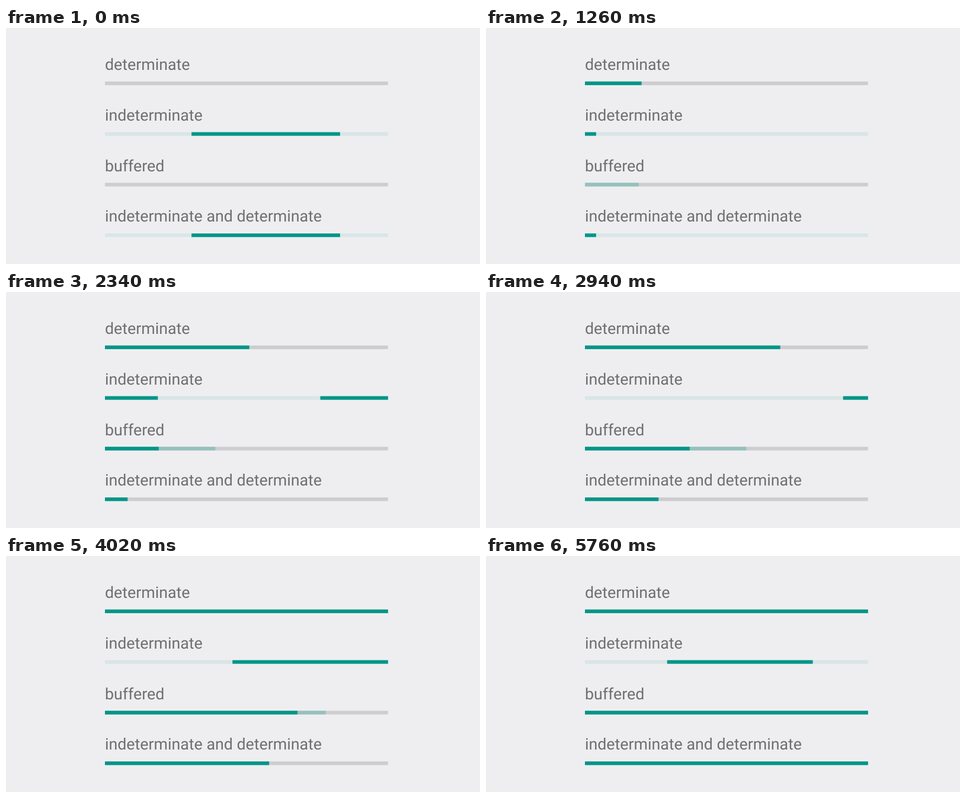
These frames come from a looping animation (800x400 px, 5820 ms). An HTML page:

```html
<!DOCTYPE html>
<html lang="en">
<head>
<meta charset="utf-8">
<title>Linear progress bars</title>
<style>
  html, body { margin: 0; width: 100%; height: 100%; overflow: hidden; background: #eeeef0; }
  svg { display: block; }
  text {
    font: 26.75px Roboto, sans-serif;
    font-variant-ligatures: none;
    text-rendering: geometricPrecision;
    fill: #6f6f70;
  }
</style>
</head>
<body>
<svg id="stage" width="800" height="400"></svg>
<script>
const LOOP = 5820, STEP = 60, CYCLE = 1927, OFFSET = 727, SWITCH = 2037;
const X = 167, W = 477.8, H = 6.1, GAP = 85.85;
const TEAL = '#009688', GREY = '#cdcdcf', PALE = '#d9e5e6', BUFFER = '#95c1bc';

const clamp = (v, max = 1) => Math.min(max, Math.max(0, v));

// Whole percent reached at time t by a bar that starts at `start`
const rise = (t, start) => clamp(Math.floor((t - start) * .0295), 100) / 100;

// The buffer pauses when it reaches 30 and 60 percent
const buffered = t => Math.max(
  Math.min(rise(t, 600), .3),
  Math.min(rise(t, 1000), .6),
  rise(t, 1350)
);

// Cubic from 0 to 1 between two times, shaped by its inner control values
function curve(start, end, a, b) {
  return u => {
    const x = clamp((u - start) / (end - start)), r = 1 - x;
    return 3 * a * x * r * r + 3 * b * x * x * r + x * x * x;
  };
}

const segments = [
  { head: curve(30, 860, .367, .633), tail: curve(110, 1280, .16, .26) },
  { head: curve(1073, 1670, .583, .917), tail: curve(1340, 1830, .546, .879) }
];

const stage = document.getElementById('stage');
function add(tag, attrs) {
  const el = document.createElementNS('http://www.w3.org/2000/svg', tag);
  for (const name in attrs) el.setAttribute(name, attrs[name]);
  return stage.appendChild(el);
}

const labels = ['determinate', 'indeterminate', 'buffered', 'indeterminate and determinate'];
const rows = labels.map((label, i) => {
  add('text', { x: X, y: 70.8 + GAP * i }).textContent = label;
  return [0, 1, 2].map(() => add('rect', { y: 90.7 + GAP * i, height: H }));
});

function bar(rect, from, to, color) {
  rect.setAttribute('x', X + W * from);
  rect.setAttribute('width', Math.max(0, W * (to - from)));
  rect.setAttribute('fill', color);
}

function determinate([track, back, front], value, buffer = 0) {
  bar(track, 0, 1, GREY);
  bar(back, 0, buffer, BUFFER);
  bar(front, 0, value, TEAL);
}

function indeterminate([track, ...runners], t) {
  const u = (t + OFFSET) % CYCLE;
  bar(track, 0, 1, PALE);
  segments.forEach((s, i) => bar(runners[i], s.tail(u), s.head(u), TEAL));
}

function draw() {
  const t = Math.floor(performance.now() % LOOP / STEP) * STEP;
  determinate(rows[0], rise(t, 580));
  indeterminate(rows[1], t);
  determinate(rows[2], rise(t, 1683), buffered(t));
  if (t < SWITCH) indeterminate(rows[3], t);
  else determinate(rows[3], rise(t, SWITCH));
  requestAnimationFrame(draw);
}
draw();
</script>
</body>
</html>
```
